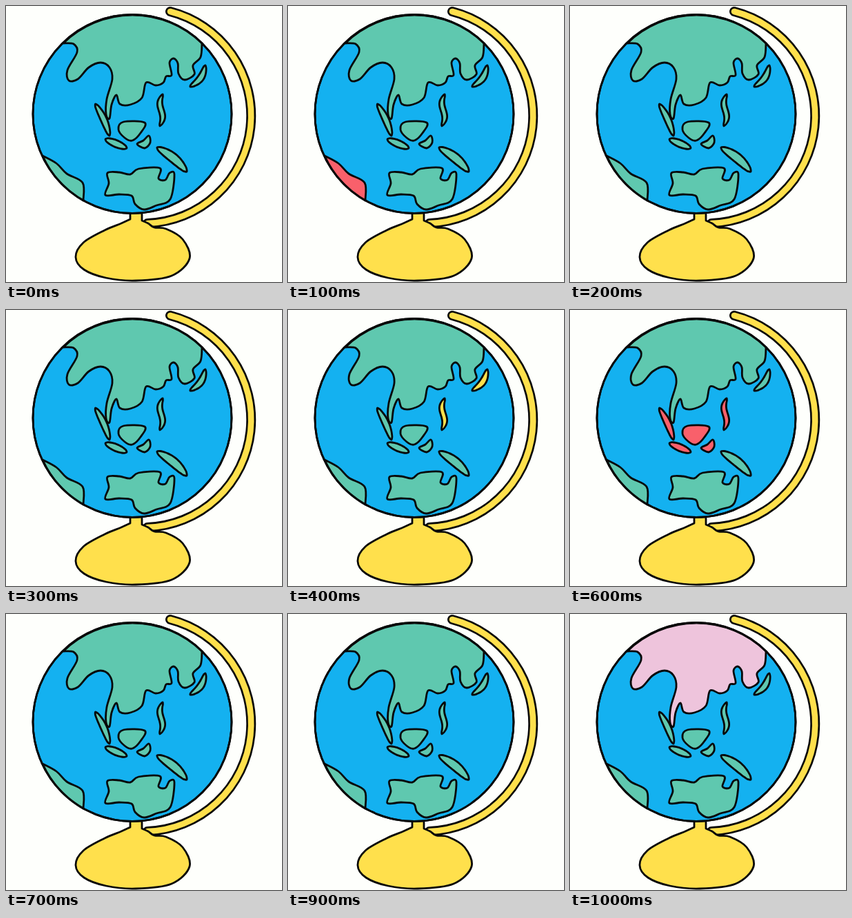
An HTML page for the animation above (1100 ms loop, 400x400 px).

```html
<!DOCTYPE html>
<html lang="en">
<head>
<meta charset="utf-8">
<title>Desk globe</title>
<style>
  html, body { margin: 0; width: 100%; height: 100%; overflow: hidden; background: #fefffc; }
  svg { display: block; width: 100vw; height: 100vh; }
</style>
</head>
<body>
<svg id="stage" viewBox="0 0 400 400" fill="none" stroke="#080808" stroke-width="2.8" stroke-linejoin="round"></svg>
<script>
const STEP = 100, LOOP = 11 * STEP;
const BLUE = '#14b1f0', GREEN = '#5fc8af', YELLOW = '#ffe04c', RED = '#f9606b', PINK = '#eec4dc';
const GLOBE = { cx: 183, cy: 156.5, r: 144 };
const stage = document.getElementById('stage');

function add(tag, attrs) {
  const el = document.createElementNS('http://www.w3.org/2000/svg', tag);
  for (const key in attrs) el.setAttribute(key, attrs[key]);
  return stage.appendChild(el);
}

// Smooth curve through key points, written as "x,y x,y ...".
function curve(text, closed) {
  const p = text.trim().split(/\s+/).map(pair => pair.split(',').map(Number));
  const n = p.length;
  const at = i => closed ? p[(i + n) % n] : p[Math.max(0, Math.min(n - 1, i))];
  let d = 'M' + p[0];
  for (let i = 0; i < (closed ? n : n - 1); i++) {
    const [a, b, c, e] = [at(i - 1), at(i), at(i + 1), at(i + 2)];
    const out = b.map((v, k) => v + (c[k] - a[k]) / 6);
    const into = c.map((v, k) => v - (e[k] - b[k]) / 6);
    d += `C${out} ${into} ${c}`;
  }
  return d + (closed ? 'Z' : '');
}

const land = d => add('path', { d, fill: GREEN });
const island = points => land(curve(points, true));

// Coast that is closed along the rim of the globe.
const rimLand = (points, sweep) =>
  land(`${curve(points)}A${GLOBE.r},${GLOBE.r} 0 0 ${sweep} ${points.split(' ')[0]}Z`);

// Slender island between two tips, bowed and waved sideways.
function strip([x0, y0], [x1, y1], half, bend = 0, wave = 0) {
  const dx = x1 - x0, dy = y1 - y0, length = Math.hypot(dx, dy), steps = 16;
  const edge = (t, side) => {
    const bow = Math.sin(Math.PI * t);
    const off = bend * bow + wave * Math.sin(2 * Math.PI * t) + side * half * Math.sqrt(Math.abs(bow));
    return [x0 + dx * t + off * dy / length, y0 + dy * t - off * dx / length];
  };
  const points = [];
  for (let i = 0; i < 2 * steps; i++) {
    points.push(i < steps ? edge(i / steps, 1) : edge(2 - i / steps, -1));
  }
  return island(points.join(' '));
}

// Curved arm
const arm = 'M238,8A156,156 0 0 1 205,315';
add('path', { d: arm, 'stroke-width': 14, 'stroke-linecap': 'round' });
add('path', { d: arm, 'stroke-width': 8.6, 'stroke-linecap': 'round', stroke: YELLOW });

// Stem and foot
add('path', {
  d: curve(`180,309 167,315 143,325 112,343 101,364 113,382 145,394 188,398 240,391 266,366
    256,338 232,323 215,321 206,315 197,311`) + 'V299H180Z',
  fill: YELLOW
});

add('circle', { ...GLOBE, fill: BLUE });

const asia = rimLand(`83,54 98,55 103,67 89,93 91,108 104,106 120,89 137,82 150,89 154,106 146,135
  145,157 150,163 153,143 160,129 165,142 180,143 197,133 203,111 217,115 228,111 232,102 240,100
  237,82 243,76 249,83 250,98 259,107 273,99 271,86 282,74 284,54`, 0);
const africa = rimLand('53,217 73,228 88,243 111,256 112,282', 1);

const japan = strip([289, 86], [267, 117], 4.5, 5);
const philippines = strip([227, 128], [223, 174], 4, 0, -3);
const indonesia = [
  strip([129.5, 142], [150, 188], 4.5, 2),
  strip([144, 193], [175, 206], 5),
  island('163,179 170,168 201,169 195,184 183,195 172,191'),
  island('207,188 209,198 201,206 190,200 199,195')
];
const oceania = [
  strip([219, 205], [262, 240], 6.5, 3),
  island(`147,242 164,241 180,244 192,236 223,235 221,250 231,252 237,242 244,244 238,280 218,289
    200,295 187,287 182,275 164,273 144,274 149,257`)
];

add('circle', GLOBE);

// Each region flashes for a single step.
const flashes = [
  { step: 1, color: RED, parts: [africa] },
  { step: 4, color: YELLOW, parts: [japan, philippines] },
  { step: 6, color: RED, parts: [philippines, ...indonesia] },
  { step: 8, color: YELLOW, parts: oceania },
  { step: 10, color: PINK, parts: [asia] }
];
const regions = flashes.flatMap(flash => flash.parts);

function draw(time) {
  const flash = flashes.find(f => f.step === Math.floor(time / STEP));
  regions.forEach(part => part.setAttribute('fill', GREEN));
  if (flash) flash.parts.forEach(part => part.setAttribute('fill', flash.color));
}

const start = performance.now();
function tick() {
  draw((performance.now() - start) % LOOP);
  requestAnimationFrame(tick);
}
tick();
</script>
</body>
</html>
```
